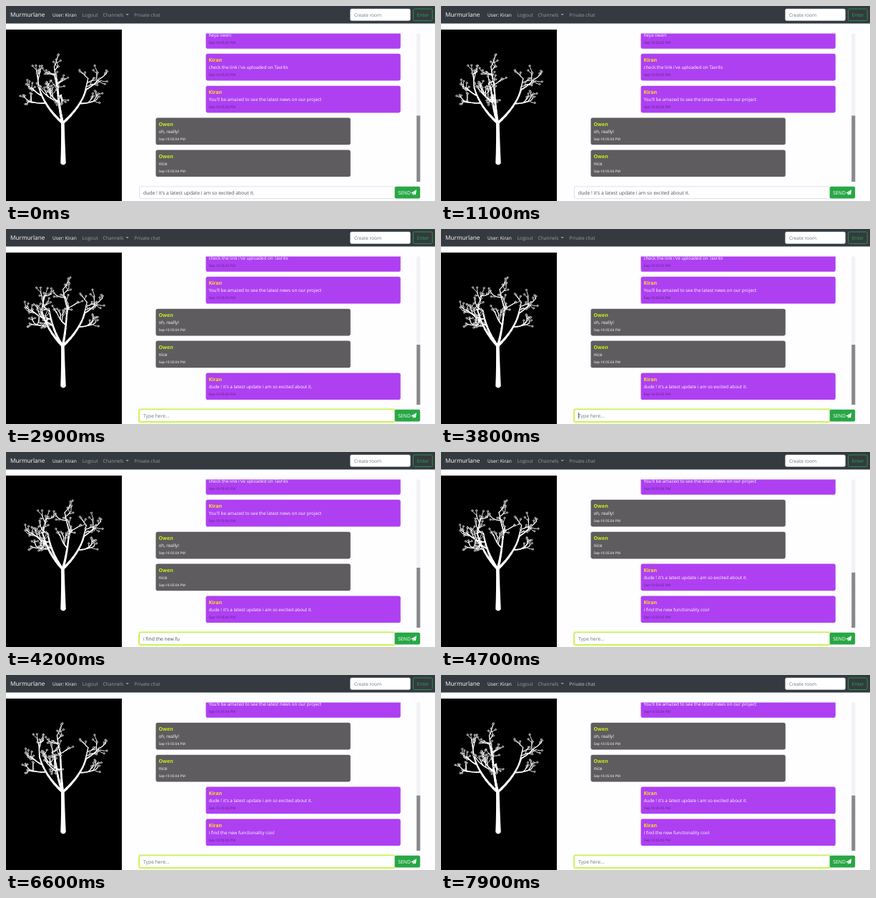
An HTML page with a canvas for the animation above (8 s loop, 600x273 px).

```html
<!DOCTYPE html>
<html lang="en">
<head>
<meta charset="utf-8">
<title>Chat room</title>
<style>
  html, body { margin: 0; width: 100%; height: 100%; overflow: hidden; background: #fefdff; }
  svg, canvas { position: absolute; left: 0; top: 0; display: block; }
  canvas { top: 33px; background: #000; }
  text { font-family: "Open Sans", "Noto Sans", sans-serif; white-space: pre; text-rendering: geometricPrecision; }
</style>
</head>
<body>
<svg id="ui" width="600" height="273" viewBox="0 0 600 273"></svg>
<canvas id="tree" width="162" height="240"></canvas>
<script>
const LOOP = 8000, STEP = 100, ROW = 44.85;
const SENT = 2200, SHOWN = 2400, FOCUS = 2900, TYPE = 3900, POSTED = 4600;
const DRAFT = "dude ! it's a latest update i am so excited about it.";
const REPLY = "i find the new functionality cool";
const ME = "Kiran", FRIEND = "Owen";

const ui = document.getElementById("ui");

function add(tag, attrs, parent = ui) {
  const el = document.createElementNS("http://www.w3.org/2000/svg", tag);
  set(el, attrs);
  parent.append(el);
  return el;
}
function set(el, attrs) {
  for (const key in attrs) el.setAttribute(key, attrs[key]);
}
function box(x, y, width, height, fill, more = {}, parent = ui) {
  return add("rect", { x, y, width, height, fill, ...more }, parent);
}
function label(str, x, y, size, fill, parent = ui, weight = 400) {
  const el = add("text", { x, y, "font-size": size, fill, "font-weight": weight }, parent);
  el.textContent = str;
  return el;
}
function show(el, on) {
  el.style.display = on ? "" : "none";
}

// Navigation bar
box(0, 0, 600, 24.5, "#343a40");
label("Murmurlane", 6, 15.3, 8.25, "#fff");
label("User: " + ME, 65, 14.8, 6.6, "#fff", ui, 500);
label("Logout", 106.5, 14.8, 6.8, "#999c9f");
label("Channels", 135.5, 14.8, 6.7, "#999c9f");
add("path", { d: "M167.5 11h4.4l-2.2 2.3z", fill: "#999c9f" });
const privateChat = label("Private chat", 179.3, 14.8, 6.6, "#999c9f");
box(481.5, 4, 84, 16.5, "#fff", { rx: 2, stroke: "#ced4da", "stroke-width": .5 });
label("Create room", 487, 14.8, 6.5, "#6c757d");
box(569.5, 4, 26.8, 16.5, "none", { rx: 2, stroke: "#28a745", "stroke-width": .8 });
label("Enter", 574.7, 14.8, 6.8, "#28a745");

// Message list
add("rect", { x: 186, y: 38.5, width: 380, height: 207.5 }, add("clipPath", { id: "view" }));
const list = add("g", {}, add("g", { "clip-path": "url(#view)" }));
const messages = [
  [ME, "heya owen", "05:02"],
  [ME, "check the link i've uploaded on Tavrilo", "05:03"],
  [ME, "You'll be amazed to see the latest news on our project", "05:04"],
  [FRIEND, "oh, really!", "05:04"],
  [FRIEND, "nice", "05:04"],
  [ME, DRAFT, "05:05"],
  [ME, REPLY, "05:05"]
].map(([who, body, time], i) => {
  const mine = who === ME, x = mine ? 279.5 : 209.5, y = 22 + i * ROW;
  const g = add("g", {}, list);
  box(x, y, 272.3, 37.7, mine ? "#ae40f2" : "#5e5c5f", { rx: 2.8 }, g);
  label(who, x + 4, y + 11.6, 7, mine ? "#ffe01a" : "#c9f212", g, 700);
  label(body, x + 4, y + 21.2, 6.3, "#fff", g, 500);
  label(`Sep-18 ${time} PM`, x + 4, y + 31.2, 4.8, mine ? "#5a2585" : "#fff", g);
  return g;
});
box(574.3, 38.5, 5, 207.5, "#f1f1f1");
const thumb = box(574.3, 153.5, 5, 92.5, "#888");

// Message field and send button
const glow = box(186, 252.4, 358.2, 17.8, "none", { rx: 2.5, stroke: "#d6fb6c", "stroke-width": 2.4 });
const field = box(186.5, 252.8, 357.5, 16.8, "#fff", { rx: 2, "stroke-width": .7 });
const entry = label("", 192, 263.7, 6.78, "#495057");
const caret = box(192, 257, .7, 8.5, "#222");
const ring = box(543, 252, 36.8, 18.2, "none", { rx: 2.5, stroke: "#8fd0a0", "stroke-width": 2 });
const send = box(543.7, 252.8, 35.5, 16.8, "#28a745", { rx: 2 });
const dots = box(543.7, 252.8, 35.5, 16.8, "none", { stroke: "#14602a", "stroke-width": .7, "stroke-dasharray": "1 1" });
label("SEND", 548.3, 263.7, 6.8, "#fff");
add("path", { d: "M574 257.6l-1.2 6.6-2.3-.9-1.3 1.7v-2.1l3.4-4-4.2 3.6-1.7-.8z", fill: "#fff", stroke: "#fff", "stroke-width": .3 });

function drawChat(t) {
  const focused = t >= FOCUS, hot = t >= 1600 && !focused;
  const scroll = t < SENT ? 0 : t < POSTED ? 1 : 2;
  list.setAttribute("transform", `translate(0 ${-scroll * ROW})`);
  show(messages[5], t >= SHOWN);
  show(messages[6], t >= POSTED);
  const top = [153.5, 162, 168.7][scroll];
  set(thumb, { y: top, height: 246 - top });

  let typed = t < SENT ? DRAFT : "";
  if (t >= TYPE && t < POSTED) {
    typed = REPLY.slice(0, Math.ceil((t - TYPE) / (POSTED - TYPE - STEP) * REPLY.length));
  }
  entry.textContent = typed || "Type here...";
  entry.setAttribute("fill", typed ? "#495057" : "#6c757d");
  show(caret, t >= 3600 && t < TYPE);
  show(glow, focused);
  field.setAttribute("stroke", focused ? "#b6e33f" : "#ced4da");
  send.setAttribute("fill", hot ? "#218838" : "#28a745");
  show(ring, hot && t >= 1900);
  show(dots, hot && t >= 1900);
  privateChat.setAttribute("fill", t >= 7600 ? "#c4c6c8" : "#999c9f");
}

// Tree: tapering branches in space that turn gently about the trunk
const ctx = document.getElementById("tree").getContext("2d");
const branches = [], tips = [];
const LENGTH = [0, 22, 13, 8], WIDTH = [3.5, 1.8, 1.2, .85, .7];
const FORKS = [.6, .8, 1];
let seed = 29;
function rand(a, b) {
  seed = (seed * 16807) % 2147483647;
  return a + (b - a) * seed / 2147483647;
}
function polar(angle, r, y) {
  return [Math.cos(angle) * r, y, Math.sin(angle) * r];
}
function plus(p, q, k = 1) {
  return p.map((v, i) => v + q[i] * k);
}
function unit(p) {
  return p.map(v => v / Math.hypot(...p));
}
function along({ from, bend, end }, f) {
  return from.map((v, i) => v * (1 - f) ** 2 + bend[i] * 2 * f * (1 - f) + end[i] * f * f);
}
function randomDir() {
  const up = rand(-1, 1);
  return polar(rand(0, 2 * Math.PI), Math.sqrt(1 - up * up), up);
}

function grow(branch, level) {
  branches.push({ ...branch, level });
  if (level === 3) {
    tips.push(branch.end);
    return;
  }
  const ahead = unit(plus(branch.end, branch.bend, -1));
  for (const f of FORKS) {
    const from = along(branch, f);
    const out = level ? [0, 0, 0] : polar(Math.atan2(from[2], from[0]), 2.4 - 2 * f, 0);
    const dir = unit(plus(plus(ahead, out), randomDir(), .95));
    const len = LENGTH[level + 1] * rand(.75, 1.2);
    const end = plus(from, dir, len);
    const bend = plus(plus(from, dir, len / 2), [0, len * .1, 0]);
    grow({ from, bend, end }, level + 1);
  }
}
for (const angle of [.1, 1.8, 3.05, 4.5]) {
  const lift = rand(-3, 4);
  grow({ from: [0, 0, 0], bend: polar(angle, 25, -22), end: polar(angle, 33, -50 - lift) }, 0);
}

function drawTree(t) {
  const a = .25 * (1 - Math.cos(t / LOOP * Math.PI * 2)), cos = Math.cos(a), sin = Math.sin(a);
  const flat = ([x, y, z]) => {
    const k = 1 + (z * cos - x * sin) / 900;
    return [79.3 + (x * cos + z * sin) * k, 131 + y * k];
  };
  ctx.clearRect(0, 0, 162, 240);
  ctx.fillStyle = ctx.strokeStyle = "#fff";
  ctx.lineCap = "round";
  ctx.beginPath();
  ctx.moveTo(77, 129);
  ctx.quadraticCurveTo(77.4, 160, 76.3, 187);
  ctx.quadraticCurveTo(80, 192, 83.8, 187);
  ctx.quadraticCurveTo(82.4, 160, 81.6, 129);
  ctx.fill();
  for (const b of branches) {
    const parts = b.level < 2 ? 8 : 2;
    for (let i = 0; i < parts; i++) {
      ctx.lineWidth = WIDTH[b.level] + (WIDTH[b.level + 1] - WIDTH[b.level]) * i / parts;
      ctx.beginPath();
      ctx.moveTo(...flat(along(b, i / parts)));
      ctx.lineTo(...flat(along(b, (i + 1) / parts)));
      ctx.stroke();
    }
  }
  ctx.lineWidth = .8;
  ctx.fillStyle = "#000";
  for (const tip of tips) {
    ctx.beginPath();
    ctx.arc(...flat(tip), 1.1, 0, 7);
    ctx.fill();
    ctx.stroke();
  }
}

const start = performance.now();
function frame() {
  const t = Math.floor((performance.now() - start) % LOOP / STEP) * STEP;
  drawChat(t);
  drawTree(t);
  requestAnimationFrame(frame);
}
frame();
</script>
</body>
</html>
```
